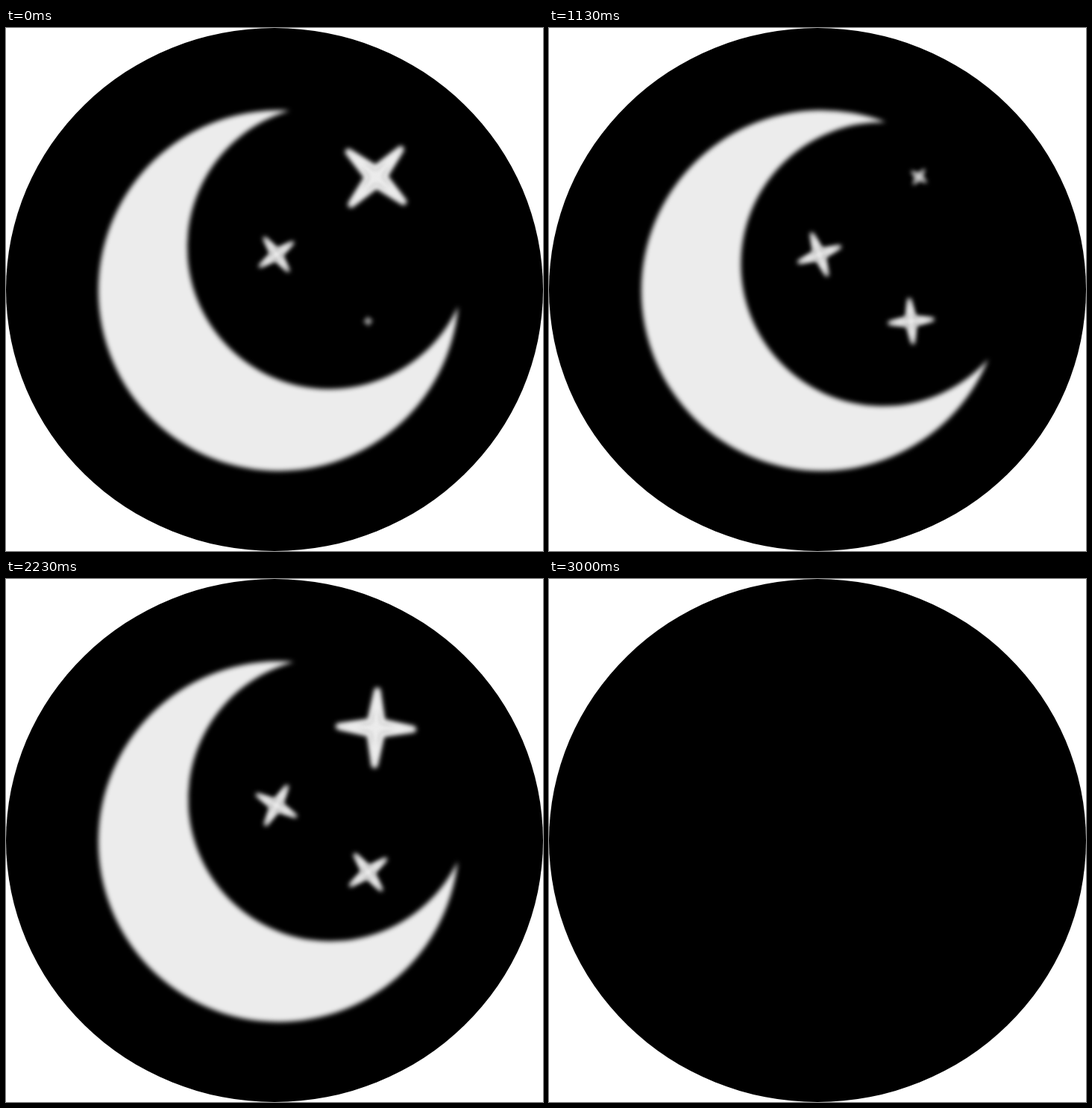
These frames come from a looping animation (720x701 px, 3860 ms). An HTML page with a canvas:

```html
<!DOCTYPE html>
<html>
<head>
<meta charset="utf-8">
<style>
html, body { margin: 0; width: 100%; height: 100%; overflow: hidden; background: #fff; }
canvas { display: block; }
</style>
</head>
<body>
<canvas width="720" height="701"></canvas>
<script>
const ctx = document.querySelector('canvas').getContext('2d');
const LOOP = 3860, VISIBLE = 3000, CYCLE = 1500, SWING = 750;
const RAD = Math.PI / 180;

// lead: ms since the star popped in at cycle start; angle in degrees, spin and gain per second
const stars = [
  { x: 496, y: 199.5, r: 53.7, lead: 310, angle: 42, spin: 58, gain: 14.5 },
  { x: 362.5, y: 303.5, r: 31, lead: 170, angle: 54, spin: 82, gain: 10 },
  { x: 485.5, y: 393, r: 31, lead: 30, angle: -4.8, spin: 79.5, gain: 0 }
];

function popScale(age) {
  const grow = 1.03 * Math.sin(Math.min(age, 270) / 240 * Math.PI / 2);
  const shrink = Math.max(0, Math.min(1, (1460 - age) / 80));
  return grow * shrink;
}

function drawStar(s, t) {
  const age = (t + s.lead) % CYCLE;
  const size = s.r * popScale(age);
  if (size <= 0) return;
  const sec = (age - s.lead) / 1000;
  const turn = (s.angle + s.spin * sec + s.gain * sec * sec) * RAD;
  ctx.beginPath();
  for (let i = 0; i < 8; i++) {
    const d = size * (i % 2 ? 0.2 : 0.915);
    const a = turn + i * Math.PI / 4;
    ctx.lineTo(s.x + d * Math.cos(a), s.y + d * Math.sin(a));
  }
  ctx.closePath();
  ctx.lineWidth = size * 0.17;
  ctx.fill();
  ctx.stroke();
}

function drawMoon(t) {
  const R = 241.7, r = 190.3, d = 89.5;
  const x = (R * R - r * r + d * d) / (2 * d);
  const outer = Math.acos(x / R), inner = Math.acos((x - d) / r);
  const tilt = -32.2 - 11.2 * Math.cos((t - 85) / SWING * 2 * Math.PI);
  ctx.save();
  ctx.translate(365.5, 352);
  ctx.rotate(tilt * RAD);
  ctx.beginPath();
  ctx.arc(0, 0, R, outer, -outer);
  ctx.arc(d, 0, r, -inner, inner, true);
  ctx.fill();
  ctx.restore();
}

function draw(t) {
  ctx.filter = 'none';
  ctx.clearRect(0, 0, 720, 701);
  ctx.fillStyle = '#000';
  ctx.beginPath();
  ctx.ellipse(360, 350.5, 360, 350.5, 0, 0, 2 * Math.PI);
  ctx.fill();
  if (t >= VISIBLE) return;
  ctx.filter = 'blur(3px)';
  ctx.fillStyle = ctx.strokeStyle = '#ececec';
  ctx.lineJoin = 'round';
  drawMoon(t);
  for (const s of stars) drawStar(s, t);
}

const start = performance.now();
function tick() {
  draw((performance.now() - start) % LOOP);
  requestAnimationFrame(tick);
}
tick();
</script>
</body>
</html>
```
